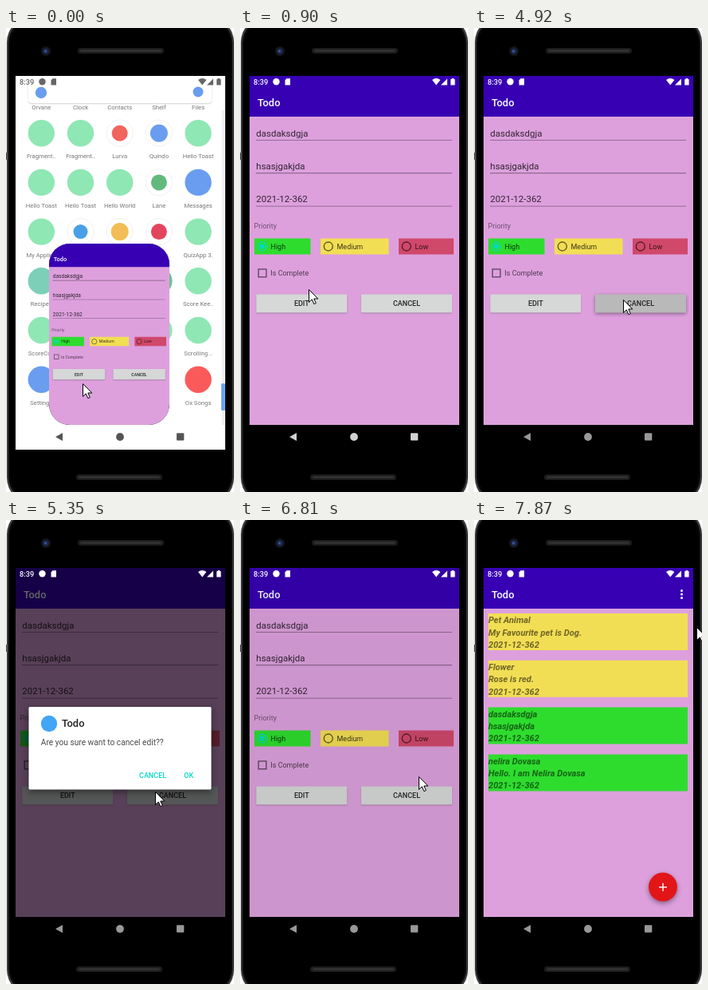
Write an HTML page with a canvas that moves like this. It is 286 px wide and 581 px high and loops after 7990 ms.

```html
<!DOCTYPE html>
<html lang="en">
<head>
<meta charset="utf-8">
<title>Todo app</title>
<style>
  html, body { margin: 0; width: 286px; height: 581px; overflow: hidden; background: #fff; }
  canvas { display: block; width: 286px; height: 581px; }
</style>
</head>
<body>
<canvas id="stage"></canvas>
<script>
const W = 286, H = 581, LOOP = 7990;
const canvas = document.getElementById('stage');
const ctx = canvas.getContext('2d');
const ratio = window.devicePixelRatio || 1;
canvas.width = W * ratio;
canvas.height = H * ratio;

const PURPLE = '#3700b3', PLUM = '#dda0dd', TEAL = '#03dac5';
const GREEN = '#2edc2e', YELLOW = '#f2de54', RED = '#d0486a';
const screen = { x: 12, y: 60, w: 263, h: 468 };

const refreshes = [0, 120, 240, 390, 660, 780, 900, 1050, 1170, 1290, 1530, 3200, 3320, 3570,
  3720, 3840, 3960, 4920, 5200, 5350, 5780, 5900, 6020, 6140, 6290, 6690, 6810, 6930,
  7050, 7200, 7320, 7440, 7570, 7720, 7870];

const pointer = [[390, 96, 445], [660, 95, 426], [900, 86, 327], [1050, 88, 304], [1290, 95, 280],
  [1530, 95, 280], [3080, 95, 280], [3200, 109, 311], [3320, 112, 318], [3570, 116, 321],
  [3720, 138, 328], [3960, 187, 340], [5350, 187, 340], [5780, 206, 332], [5900, 251, 312],
  [6140, 226, 321], [6290, 224, 321], [7050, 224, 321], [7200, 228, 308], [7440, 266, 190],
  [7570, 281, 147], [7720, 280, 147], [7870, 279, 134]];
const opening = [[0, 0], [120, .72], [240, .97], [390, 1]];
const dimming = [[5070, 0], [5200, .28], [5350, .6], [6290, .6], [6690, .32], [6810, .07], [6930, 0]];
const dialogFade = [[5070, 0], [5200, .5], [5350, 1], [6290, 1], [6690, .4], [6810, 0]];
const closing = [[6930, 0, 1], [7050, 4, .9], [7200, 10, .45], [7320, 16, 0]];
const navLight = [[390, 255], [1530, 152]];

const mix = (a, b, p) => a + (b - a) * p;

function track(keys, t) {
  if (t <= keys[0][0]) return keys[0].slice(1);
  const i = keys.findIndex(k => k[0] > t);
  if (i < 0) return keys[keys.length - 1].slice(1);
  const a = keys[i - 1], b = keys[i], p = (t - a[0]) / (b[0] - a[0]);
  return a.slice(1).map((v, n) => mix(v, b[n + 1], p));
}

function box(x, y, w, h, fill, radius = 0) {
  ctx.beginPath();
  ctx.roundRect(x, y, w, h, radius);
  ctx.fillStyle = fill;
  ctx.fill();
}

function disc(x, y, r, fill) {
  ctx.beginPath();
  ctx.arc(x, y, r, 0, Math.PI * 2);
  ctx.fillStyle = fill;
  ctx.fill();
}

function ring(x, y, r, color, width = 1.3) {
  ctx.beginPath();
  ctx.arc(x, y, r, 0, Math.PI * 2);
  ctx.strokeStyle = color;
  ctx.lineWidth = width;
  ctx.stroke();
}

function shape(points, fill) {
  ctx.beginPath();
  points.forEach(([x, y]) => ctx.lineTo(x, y));
  ctx.closePath();
  ctx.fillStyle = fill;
  ctx.fill();
}

function text(str, x, y, size, color, weight = '400', align = 'left') {
  ctx.font = `${weight} ${size}px Roboto, sans-serif`;
  ctx.textAlign = align;
  ctx.fillStyle = color;
  ctx.fillText(str, x, y);
}

function layer(draw) {
  ctx.save();
  draw();
  ctx.restore();
}

function shadow(blur, dy, alpha) {
  ctx.shadowColor = `rgba(0,0,0,${alpha})`;
  ctx.shadowBlur = blur * ratio;
  ctx.shadowOffsetY = dy * ratio;
}

function phone() {
  box(0, 0, W, H, '#fff');
  box(1, -14, 285, 609, '#3b3b3b', 32);
  box(3, -12, 281, 605, '#0a0a0a', 31);
  box(5, -10, 277, 601, '#000', 30);
  box(0, 156, 2, 9, '#555');
  for (const [x, y] of [[90, 25], [88, 559]]) {
    box(x, y, 108, 7, '#1c1c1c', 3.5);
    box(x + 3, y + 2, 102, 3, '#303030', 1.5);
  }
  disc(50, 29, 6, '#14161d');
  disc(50, 29, 3.5, '#1d2950');
  disc(49.5, 29, 1.6, '#3a56a0');
}

function statusBar(color) {
  text('8:39', 17, 71, 9.2, color, '500');
  disc(45.5, 67.3, 4.2, color);
  shape([[58.5, 63.3], [63, 63.3], [63, 71.5], [56.5, 71.5], [56.5, 65.5]], color);
  ctx.beginPath();
  ctx.moveTo(241, 65);
  ctx.quadraticCurveTo(246.2, 60.8, 251.4, 65);
  ctx.lineTo(246.2, 71.6);
  ctx.fillStyle = color;
  ctx.fill();
  shape([[252, 71.5], [260, 71.5], [260, 63.5]], color);
  box(264.2, 64, 5.4, 7.6, color, .7);
  box(265.7, 63, 2.4, 1.5, color);
}

function navIcons(color) {
  shape([[62, 512], [71, 507], [71, 517]], color);
  disc(143, 512, 4.9, color);
  box(214, 507.3, 9.3, 9.3, color, 1);
}

function appBar() {
  box(12, 60, 263, 51, PURPLE);
  text('Todo', 22, 98, 12.9, '#fff', '500');
}

function windowBase() {
  box(12, 60, 263, 468, '#000');
  box(12, 60, 263, 437, PLUM);
  appBar();
}

function button(label, x, pressed) {
  layer(() => {
    shadow(pressed ? 4 : 1.5, pressed ? 1.5 : .8, pressed ? .4 : .3);
    box(x, 333.5, 114, 23, pressed ? '#b9b9b9' : '#d6d7d7', 1);
  });
  text(label, x + 57, 348.4, 9, '#222', '500', 'center');
}

function choice(label, x, w, fill, checked) {
  box(x, 263.5, w, 20, fill);
  const color = checked ? TEAL : 'rgba(0,0,0,.62)';
  ring(x + 9.8, 273.5, 5.5, color);
  if (checked) disc(x + 9.8, 273.5, 3, color);
  text(label, x + 20.5, 276.8, 9, 'rgba(0,0,0,.75)');
}

function form(pressed) {
  windowBase();
  ['dasdaksdgja', 'hsasjgakjda', '2021-12-362'].forEach((value, i) => {
    const y = 135.5 + i * 41.4;
    text(value, 20.3, y, 11.5, '#332533');
    box(20, y + 4.4, 246, .9, '#7c5b7c');
  });
  text('Priority', 17.5, 251, 9, 'rgba(0,0,0,.5)');
  choice('High', 18, 70.5, GREEN, true);
  choice('Medium', 101, 85.5, YELLOW);
  choice('Low', 199, 69, RED);
  ctx.strokeStyle = 'rgba(0,0,0,.6)';
  ctx.lineWidth = 1.3;
  ctx.strokeRect(23.2, 302, 9.8, 9.8);
  text('Is Complete', 38.3, 310.3, 9, 'rgba(0,0,0,.64)');
  button('EDIT', 20.3);
  button('CANCEL', 152, pressed);
}

function list() {
  windowBase();
  [88.5, 93, 97.5].forEach(y => disc(260.5, y, 1.5, '#fff'));
  const items = [
    ['Pet Animal', 'My Favourite pet is Dog.', YELLOW],
    ['Flower', 'Rose is red.', YELLOW],
    ['dasdaksdgja', 'hsasjgakjda', GREEN],
    ['nelira Dovasa', 'Hello. I am Nelira Dovasa', GREEN]
  ];
  items.forEach(([title, note, fill], i) => {
    const y = 117 + i * 58.8;
    box(18, y, 250, 46, fill);
    [title, note, '2021-12-362'].forEach((line, n) =>
      text(line, 18, y + 12.4 + n * 15.2, 11.1, 'rgba(0,0,0,.54)', 'italic 700'));
  });
  layer(() => {
    shadow(6, 2.5, .4);
    disc(237, 459.5, 18, '#e21618');
  });
  box(232, 459, 10, 1.4, '#fff');
  box(236.3, 454.7, 1.4, 10, '#fff');
}

const MINT = '#8fe7b4', BLUE = '#6a9df0', ROSE = '#f2645e';
const launcherRows = [
  [['Orvane'], ['Clock'], ['Contacts'], ['Shelf'], ['Files']],
  [['Fragment..', MINT], ['Fragment..', MINT], ['Lurva', ROSE, 10], ['Quindo', BLUE, 11], ['Hello Toast', MINT]],
  [['Hello Toast', MINT], ['Hello Toast', MINT], ['Hello World', MINT], ['Lane', '#63b97c', 10], ['Messages', BLUE]],
  [['My Applic..', MINT], ['Phone', '#4aa0e8', 9], ['Photos', '#f3bd55', 11], ['Videos', '#e4455e', 10], ['QuizApp 3.', MINT]],
  [['Recipes', '#7dcfb8'], ['', MINT], ['', MINT], ['', '#6fbf95'], ['Score Kee..', MINT]],
  [['ScoreCo..', MINT], ['', MINT], ['', MINT], ['', MINT], ['Scrolling ..', MINT]],
  [['Settings', BLUE], ['', MINT], ['', MINT], [''], ['Ox Songs', '#fb5a5a']]
];

function launcher() {
  box(12, 60, 263, 468, '#fff');
  launcherRows.forEach((row, r) => row.forEach(([label, color, size = 16.7], c) => {
    const x = 44.3 + c * 49.2, y = 70 + r * 61.7;
    if (color) {
      if (size < 16) ring(x, y, 16.5, '#ededed', .8);
      disc(x, y, size, color);
    }
    text(label, x, y + 31.5, 7.7, '#777', '400', 'center');
  }));
  layer(() => {
    shadow(2, .7, .22);
    box(28, 60, 230, 34, '#fff', [0, 0, 4, 4]);
  });
  disc(44, 81, 7.2, BLUE);
  disc(241, 80, 6.5, BLUE);
  box(270.5, 103, 4, 394, '#f1f1f1');
  box(270, 445, 5, 34, '#6aa5f0', 1.5);
}

function openingWindow(p) {
  const q = Math.min(1, p * 1.04);
  const x = mix(54, 12, p), y = mix(270, 60, q), w = mix(151, 263, p), h = mix(227, 468, q);
  const scale = w / screen.w;
  ctx.beginPath();
  ctx.roundRect(x, y, w, h, mix(26, 0, q));
  ctx.clip();
  ctx.translate(x, y);
  ctx.scale(scale, scale);
  ctx.translate(-screen.x, -screen.y);
  form(false);
}

function dialog(alpha) {
  ctx.globalAlpha = alpha;
  layer(() => {
    shadow(8, 3, .45);
    box(28.5, 234, 229, 103.5, '#fff', 1.5);
  });
  disc(54, 255, 10.2, '#42a5f5');
  text('Todo', 70, 259.3, 12.9, '#222', '500');
  text('Are you sure want to cancel edit??', 43.8, 282, 10.2, '#4a4a4a');
  text('CANCEL', 167, 323.2, 9, TEAL, '500');
  text('OK', 223.3, 323.2, 9, TEAL, '500');
}

function arrow([x, y]) {
  ctx.translate(x + .5, y + .5);
  shape([[0, 0], [0, 16], [3.8, 12.4], [6.4, 18.2], [8.8, 17.1], [6.3, 11.5], [11.3, 11.5]], '#fff');
  ctx.strokeStyle = '#000';
  ctx.lineWidth = 1;
  ctx.stroke();
}

function render(t) {
  const [open] = track(opening, t);
  const [dim] = track(dimming, t);
  const [fade] = track(dialogFade, t);
  const [shift, alpha] = track(closing, t);
  const early = open < .5;

  ctx.setTransform(ratio, 0, 0, ratio, 0, 0);
  phone();
  layer(() => {
    ctx.beginPath();
    ctx.rect(screen.x, screen.y, screen.w, screen.h);
    ctx.clip();
    if (open < 1) {
      launcher();
      box(12, 60, 263, 468, `rgba(255,255,255,${open * .8})`);
      layer(() => openingWindow(open));
    } else {
      if (t > 6930) list();
      if (alpha > 0) layer(() => {
        ctx.globalAlpha = alpha;
        ctx.translate(0, shift);
        form(t >= 4920 && t < 5200);
      });
      if (dim > 0) box(12, 60, 263, 437, `rgba(0,0,0,${dim})`);
      if (fade > 0) layer(() => dialog(fade));
    }
    const light = Math.round(track(navLight, t)[0]);
    statusBar(early ? '#666' : '#fff');
    navIcons(early ? '#555' : `rgb(${light},${light},${light})`);
  });
  layer(() => arrow(track(pointer, t)));
}

const start = performance.now();
function tick() {
  const now = (performance.now() - start) % LOOP;
  render(refreshes.findLast(time => time <= now) ?? 0);
  requestAnimationFrame(tick);
}
tick();
</script>
</body>
</html>
```
